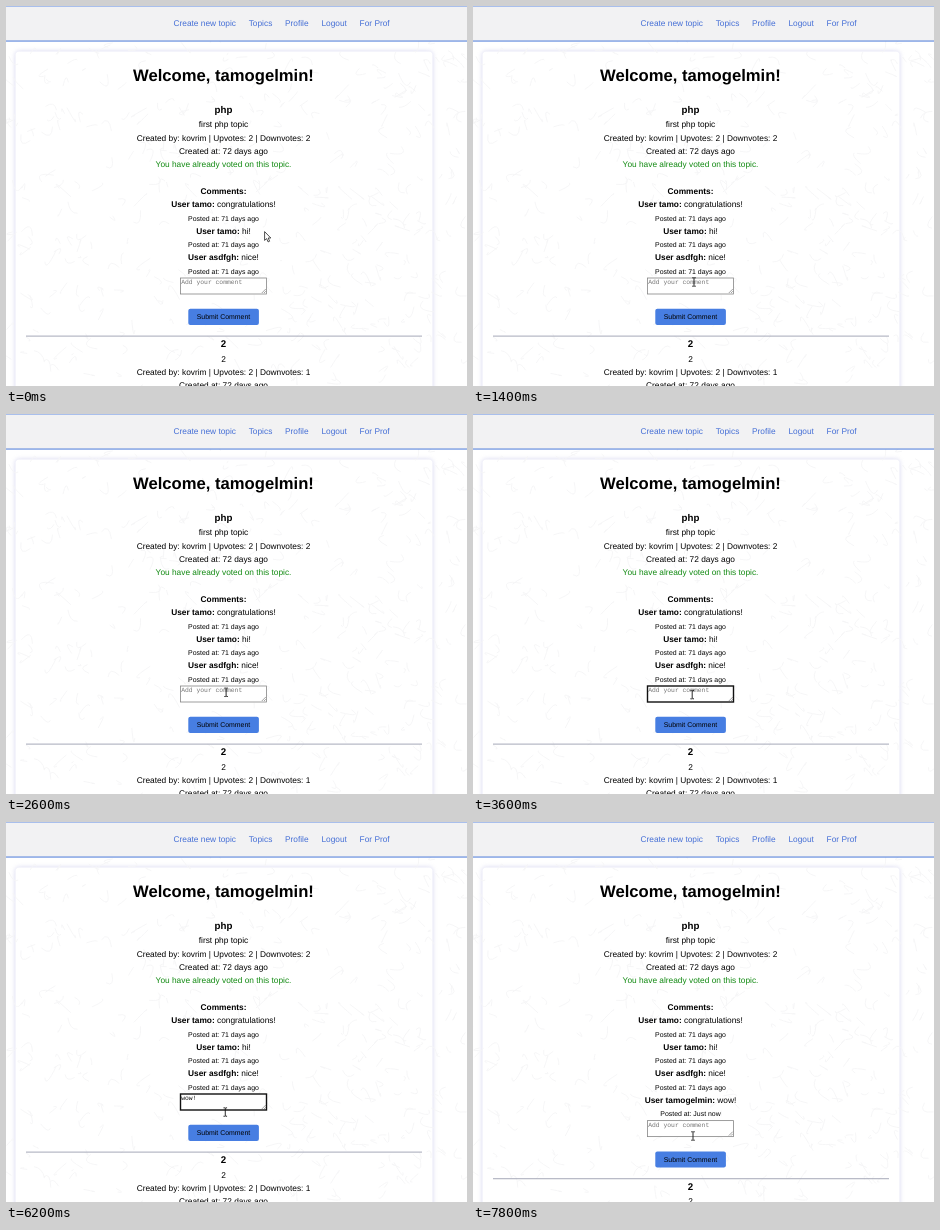
An HTML page for the animation above (8 s loop, 461 px wide and 380 px high).

```html
<!DOCTYPE html>
<html lang="en">
<head>
<meta charset="utf-8">
<style>
  html, body { margin: 0; width: 100%; height: 100%; overflow: hidden; background: #fff; }
  svg { display: block; width: 461px; height: 380px; }
  text { font: 8.34px "Liberation Sans", Arial, sans-serif; text-rendering: geometricPrecision; white-space: pre; }
  .mid { text-anchor: middle; }
  .h1 { font-size: 16.64px; font-weight: bold; }
  .h3 { font-size: 9.73px; font-weight: bold; }
  .small { font-size: 6.93px; }
  .bold { font-weight: bold; }
  .green { fill: #128a12; }
  .nav { fill: #456fd6; }
  .field { font: 6.36px "Liberation Mono", monospace; }
  .hint { font: 6px "Open Sans", sans-serif; fill: #5a5a5a; }
  .card { fill: #fff; filter: drop-shadow(0 0 2.5px rgba(105, 105, 200, .3)); }
</style>
</head>
<body>
<svg viewBox="0 0 461 380">
  <rect class="card" x="9.5" y="45.5" width="417" height="360" rx="4"/>
  <path id="texture" fill="none" stroke="#f5f5f6" stroke-width=".9"/>
  <rect width="461" height="35" fill="#f2f2f3"/>
  <rect width="461" height="1" fill="#a9bfec"/>
  <rect y="34.5" width="461" height="1.1" fill="#5c86dc"/>
  <g id="page"></g>
  <g id="newComment"></g>
  <g id="lower">
    <rect id="box" x="174.5" y="272" width="86" height="16" fill="#fff"/>
    <text id="value" class="field" x="175.2" y="278.4"></text>
    <path d="M255.8 287l4-4M258 287l1.8-1.8" stroke="#666" stroke-width=".6"/>
    <rect id="button" x="182.3" y="302.8" width="70.6" height="16.2" rx="2"/>
    <rect x="20" y="329.6" width="396" height="1" fill="#a6a9b8"/>
  </g>
  <g id="tooltip">
    <rect x="226.5" y="281.8" width="72" height="12.6" fill="#fff" stroke="#a5a5a5" stroke-width=".8"/>
    <text class="hint" x="230" y="290.3">Please fill out this field.</text>
  </g>
  <g id="cursor">
    <path id="arrow" d="M0 0V8.8L2 7L3.5 10.3L5 9.6L3.6 6.4H6.2Z" fill="#fff" stroke="#222" stroke-width=".8"/>
    <path id="beam" d="M-1.8-4.2H-.5L0-3.8L.5-4.2H1.8M0-3.8V3.8M-1.8 4.2H-.5L0 3.8L.5 4.2H1.8" fill="none" stroke="#111" stroke-width=".9"/>
    <path id="hand" d="M-.6-4Q.2-4.8 1-4V-1L3.4-.5Q4-.3 3.9.6L3.3 4H-.3L-2.2 1Q-2.3 0-1.4.1L-.6.8Z" fill="#fff" stroke="#222" stroke-width=".6"/>
  </g>
</svg>
<script>
const $ = id => document.getElementById(id);
const LOOP = 8000, STEP = 200, LINE = 13.31, CENTER = 217.5;

function addText(parent, content, y, cls = "", x = CENTER) {
  const el = document.createElementNS("http://www.w3.org/2000/svg", "text");
  el.setAttribute("x", x);
  el.setAttribute("y", y);
  el.setAttribute("class", cls);
  el.innerHTML = content;
  $(parent).append(el);
}
const addMid = (parent, content, y, cls = "") => addText(parent, content, y, "mid " + cls);

function addComment(parent, user, message, when, y) {
  addMid(parent, `<tspan class="bold">User ${user}:</tspan> ${message}`, y);
  addMid(parent, `Posted at: ${when}`, y + LINE, "small");
}

function addTopic(parent, title, body, down, y) {
  addMid(parent, title, y, "h3");
  addMid(parent, body, y + 14.3);
  addMid(parent, `Created by: kovrim | Upvotes: 2 | Downvotes: ${down}`, y + 14.3 + LINE);
  addMid(parent, "Created at: 72 days ago", y + 14.3 + 2 * LINE);
}

[["Create new topic", 167.5], ["Topics", 242.7], ["Profile", 279], ["Logout", 315.4], ["For Prof", 353.6]]
  .forEach(([label, x]) => addText("page", label, 20.3, "nav", x));
addMid("page", "Welcome, tamogelmin!", 75.4, "h1");
addTopic("page", "php", "first php topic", 2, 107);
addMid("page", "You have already voted on this topic.", 161.2, "green");
addMid("page", "Comments:", 187.9, "bold");
[["tamo", "congratulations!"], ["tamo", "hi!"], ["asdfgh", "nice!"]]
  .forEach(([user, message], i) => addComment("page", user, message, "71 days ago", 201.2 + i * 2 * LINE));
addComment("newComment", "tamogelmin", "wow!", "Just now", 281.1);
addMid("lower", "Submit Comment", 313.2, "small");
addTopic("lower", "2", "2", 1, 341.3);

// Faint background scribbles.
let seed = 7;
const random = () => (seed = seed * 16807 % 2147483647) / 2147483647;
const offset = () => (random() * 24 - 12).toFixed(1);
$("texture").setAttribute("d", Array.from({ length: 420 }, () =>
  `M${(random() * 461).toFixed(1)} ${(36 + random() * 344).toFixed(1)}q${offset()} ${offset()} ${offset()} ${offset()}`).join(""));

// time, x, y
const route = [
  [0, 258.6, 225.6], [200, 258.6, 225.6], [600, 227.3, 265], [1000, 221, 276],
  [2400, 221, 276], [2800, 219.2, 280.6], [6000, 219.2, 280.6],
  [6600, 219.5, 317], [7000, 219.5, 317], [7400, 220, 314], [LOOP, 220, 314]
];
function pointer(t) {
  const i = route.findIndex((p, k) => k && t <= p[0]);
  const [t0, x0, y0] = route[i - 1], [t1, x1, y1] = route[i];
  const u = (t - t0) / (t1 - t0), ease = u * u * (3 - 2 * u);
  return [x0 + (x1 - x0) * ease, y0 + (y1 - y0) * ease];
}

const typingTimes = [4400, 4600, 4800, 5600];
const show = (id, on) => $(id).style.display = on ? "" : "none";

function draw(t) {
  const posted = t >= 7000, focused = t >= 2800 && t < 6600;
  const [x, y] = pointer(t);
  const hover = !posted && y > 302;
  const typed = posted ? "" : "wow!".slice(0, typingTimes.filter(at => t >= at).length);

  show("newComment", posted);
  $("lower").setAttribute("transform", `translate(0 ${posted ? 2 * LINE : 0})`);
  $("box").setAttribute("stroke", focused ? "#111" : "#858585");
  $("box").setAttribute("stroke-width", focused ? 1.4 : 0.8);
  $("value").textContent = typed || "Add your comment";
  $("value").setAttribute("fill", typed ? "#111" : "#757575");
  $("button").setAttribute("fill", hover ? "#1853c2" : "#477ee2");
  show("tooltip", t >= 1600 && t < 2600);

  $("cursor").setAttribute("transform", `translate(${x} ${y})`);
  show("arrow", t < 400);
  show("hand", hover);
  show("beam", t >= 400 && !hover);
}

function tick() {
  draw(Math.floor(performance.now() % LOOP / STEP) * STEP);
  requestAnimationFrame(tick);
}
tick();
</script>
</body>
</html>
```
